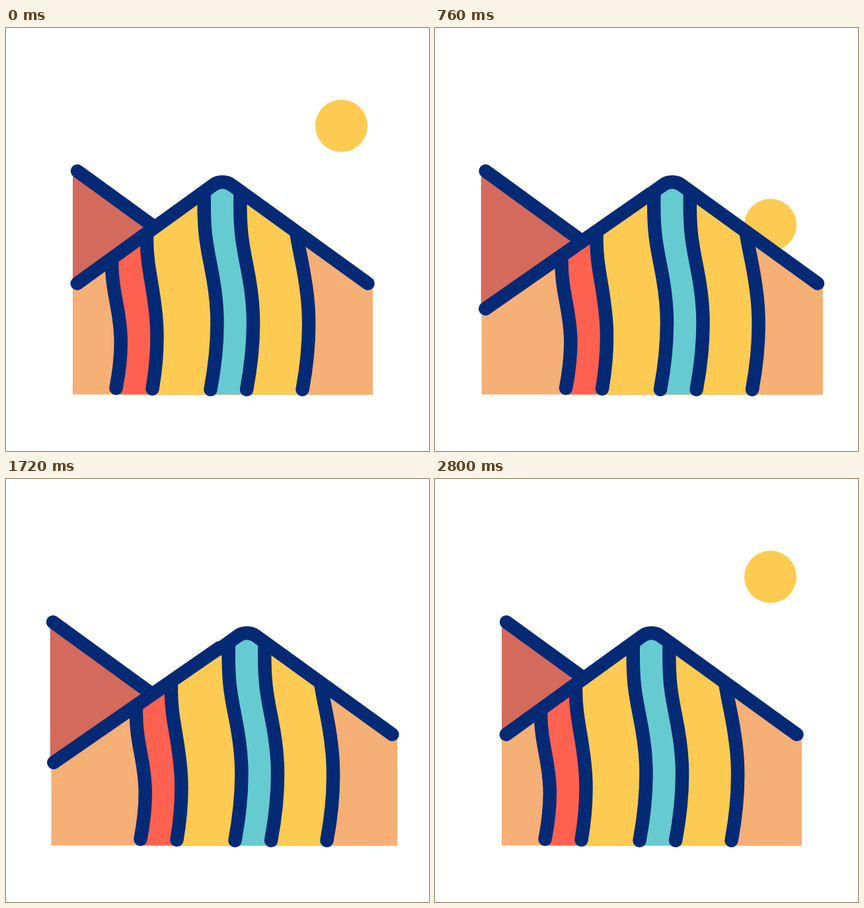
Recreate the animation shown at these times as an HTML page with a canvas. Size 640x640 px, loop 3100 ms.

```html
<!DOCTYPE html>
<html lang="en">
<head>
<meta charset="utf-8">
<title>Mountain fish</title>
<style>
  html, body { margin: 0; width: 100%; height: 100%; overflow: hidden; background: #fff; }
  canvas { display: block; width: 100vmin; height: 100vmin; }
</style>
</head>
<body>
<canvas id="stage" width="640" height="640"></canvas>
<script>
const ctx = document.getElementById('stage').getContext('2d');
const LOOP = 3100;
const NAVY = '#042a76', YELLOW = '#fdcb51', ORANGE = '#f6af75';
const RED = '#ff6150', TEAL = '#66cbd0', TAIL = '#d46a5c';
const BASE = 554.5, SLOPE = 0.7226, TAIL_SLOPE = 0.726;

const clamp = x => Math.min(1, Math.max(0, x));
const lerp = (a, b, p) => a + (b - a) * p;
const span = (t, from, to) => clamp((t - from) / (to - from));

// Leaves at full speed and settles gently.
const settle = p => p * (1 - p) ** 2 + 3 * p * p * (1 - p) + p ** 3;
const smooth = p => (1 - Math.cos(Math.PI * p)) / 2;
const backIn = p => p * p * (2.70158 * p - 1.70158);

// Offsets from rest for each key pose.
const REST = { shift: 0, footX: 0, footY: 0, tail: 0, body: 0, bend: 20, lift: 0 };
const WIDE = { shift: 31.1, footX: 31.2, footY: 38, tail: 31.2, body: 30.3, bend: 32, lift: 0.4 };
const FULL = { shift: 38.5, footX: 36.6, footY: 43.6, tail: 35, body: 33, bend: 43.5, lift: 2.4 };

function mix(a, b, p) {
  const pose = {};
  for (const key in a) pose[key] = lerp(a[key], b[key], p);
  return pose;
}

function poseAt(t) {
  if (t < 700) return mix(REST, WIDE, settle(span(t, 200, 700)));
  if (t < 1990) return mix(WIDE, FULL, span(t, 700, 1990));
  return mix(FULL, REST, settle(span(t, 1990, 2740)));
}

function sunY(t) {
  if (t < 2000) return 148 + 430 * backIn(span(t, 205, 882));
  if (t < 2520) return 104.5 + 474 * (1 - span(t, 2000, 2520)) ** 2.1;
  return lerp(104.5, 148, smooth(span(t, 2520, 2800)));
}

// Top point, cubic segments, and the colour to the right of each stripe.
const tallStripe = (dx, fill) => ({
  fill, top: [300 + dx, 248],
  curves: [
    [298.5 + dx, 303, 303 + dx, 326, 309 + dx, 356],
    [316 + dx, 391, 328.3 + dx, 446, 309.5 + dx, 547]
  ]
});
const STRIPES = [
  { fill: RED, top: [160, 350], curves: [[159, 420, 186.5, 440, 166.5, 545]] },
  { fill: YELLOW, top: [213, 318], curves: [[212, 385, 241.5, 428, 221.5, 546]] },
  tallStripe(0, TEAL),
  tallStripe(54.6, YELLOW),
  { fill: ORANGE, top: [439, 308], curves: [[446, 360, 472, 420, 448.5, 547]] }
];

function traceStripe({ top, curves }) {
  ctx.beginPath();
  ctx.moveTo(top[0], 200);
  ctx.lineTo(...top);
  for (const c of curves) ctx.bezierCurveTo(...c);
}

function polygon(points, fill) {
  ctx.beginPath();
  for (const p of points) ctx.lineTo(...p);
  ctx.closePath();
  ctx.fillStyle = fill;
  ctx.fill();
}

function draw(t) {
  const pose = poseAt(t);
  const axis = 327.5 + pose.shift;
  const apex = [axis, 227.5];
  const tip = [547.5 + pose.shift, 386.5];
  const foot = [107.7 - pose.footX, 386.5 + pose.footY];
  const bend = [axis - pose.bend, 227.5 + pose.bend * SLOPE];
  const slopeTop = [bend[0], bend[1] - pose.lift];
  const tailTip = [108 - pose.shift, 216.5];

  const roofSlope = (foot[1] - slopeTop[1]) / (slopeTop[0] - foot[0]);
  const joinX = (foot[1] - tailTip[1] + TAIL_SLOPE * tailTip[0] + roofSlope * foot[0])
    / (TAIL_SLOPE + roofSlope);
  const join = [joinX, foot[1] - roofSlope * (joinX - foot[0])];

  const traceRoof = () => {
    ctx.beginPath();
    ctx.moveTo(...foot);
    ctx.lineTo(...slopeTop);
    ctx.lineTo(...bend);
    ctx.arcTo(...apex, ...tip, 23.5);
    ctx.lineTo(...tip);
  };

  ctx.fillStyle = '#fff';
  ctx.fillRect(0, 0, 640, 640);
  ctx.lineWidth = 20.5;
  ctx.lineCap = ctx.lineJoin = 'round';
  ctx.strokeStyle = NAVY;

  const y = sunY(t);
  if (y < 500) {
    ctx.beginPath();
    ctx.arc(507.5, y, 39.5, 0, 2 * Math.PI);
    ctx.fillStyle = YELLOW;
    ctx.fill();
  }

  const tailLeft = 101 - pose.tail;
  polygon([[tailLeft, tailTip[1] + 1], tailTip, join, foot, [tailLeft, foot[1]]], TAIL);

  // Everything under the roof line.
  ctx.save();
  traceRoof();
  ctx.lineTo(640, tip[1]);
  ctx.lineTo(640, 640);
  ctx.lineTo(0, 640);
  ctx.lineTo(0, foot[1]);
  ctx.clip();

  const left = 101 - pose.body, right = 555 + pose.shift;
  ctx.fillStyle = ORANGE;
  ctx.fillRect(left, 200, right - left, BASE - 200);
  ctx.translate(pose.shift, 0);
  for (const stripe of STRIPES) {
    traceStripe(stripe);
    const bottomX = stripe.curves[stripe.curves.length - 1][4];
    ctx.lineTo(bottomX, BASE);
    ctx.lineTo(555, BASE);
    ctx.lineTo(555, 200);
    ctx.fillStyle = stripe.fill;
    ctx.fill();
  }
  for (const stripe of STRIPES) {
    traceStripe(stripe);
    ctx.stroke();
  }
  ctx.restore();

  ctx.beginPath();
  ctx.moveTo(...tailTip);
  ctx.lineTo(...join);
  ctx.stroke();
  traceRoof();
  ctx.stroke();
}

const start = performance.now();
function tick() {
  draw((performance.now() - start) % LOOP);
  requestAnimationFrame(tick);
}
tick();
</script>
</body>
</html>
```
